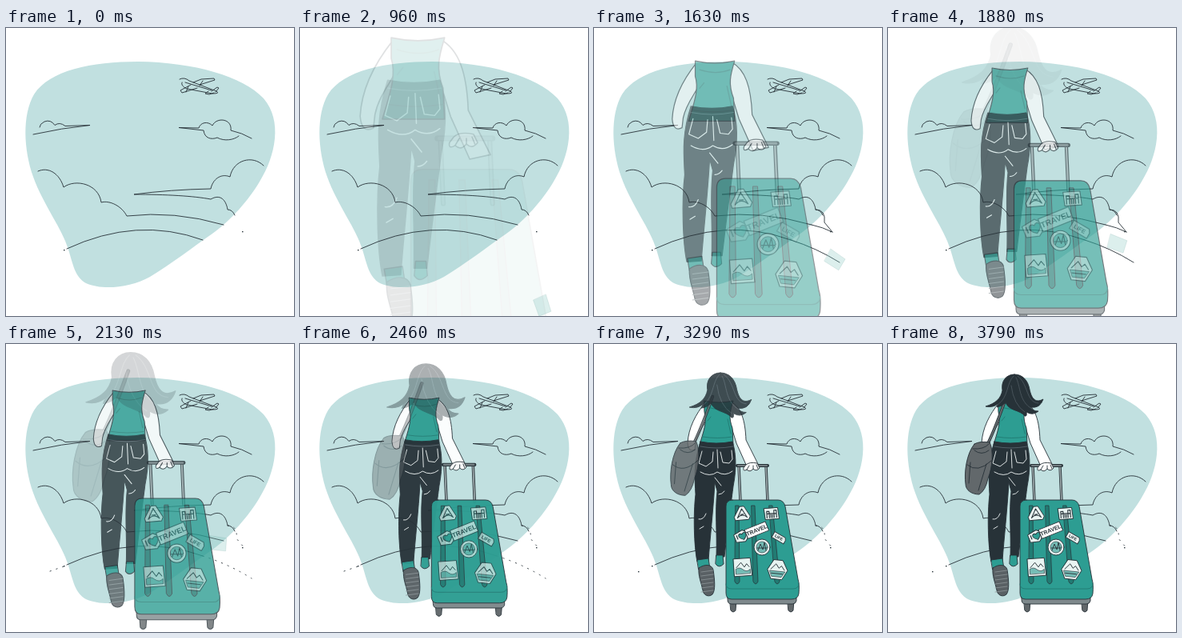
An HTML page with a canvas for the animation above (3.83 s loop, 360 by 360 pixels).

```html
<!DOCTYPE html>
<html>
<head>
<meta charset="utf-8">
<style>
html, body { margin: 0; width: 100%; height: 100%; overflow: hidden; background: #fff; }
canvas { display: block; width: 360px; height: 360px; }
</style>
</head>
<body>
<canvas id="stage" width="360" height="360"></canvas>
<script>
const LOOP = 3830, STEP = 40, START = 710;
const INK = '#273238', TEAL = '#2d9d92', DEEP = '#217b73', SKY = '#c1e0e0', GREY = '#62686b';
const CENTRE = [178, 186];
const stage = document.getElementById('stage').getContext('2d');
const layerCanvas = document.createElement('canvas');
layerCanvas.width = layerCanvas.height = 360;
const layer = layerCanvas.getContext('2d');

const clamp = v => Math.min(1, Math.max(0, v));
const paths = new Map();
function pathOf(d) {
  if (!paths.has(d)) paths.set(d, new Path2D(d));
  return paths.get(d);
}
function shape(c, d, fill, stroke = INK, width = 0.9) {
  const p = pathOf(d);
  if (fill) { c.fillStyle = fill; c.fill(p); }
  if (stroke) { c.strokeStyle = stroke; c.lineWidth = width; c.stroke(p); }
}
const line = (c, d, color = INK, width = 0.9) => shape(c, d, null, color, width);

function placed(c, x, y, degrees, draw) {
  c.save();
  c.translate(x, y);
  c.rotate(degrees * Math.PI / 180);
  draw();
  c.restore();
}

function scenery(c) {
  shape(c, 'M165 42C235 43 296 60 322 88C346 116 337 160 317 192C304 214 282 240 258 257C235 273 205 296 180 311C155 325 120 328 100 319C86 311 84 296 78 277C70 250 47 222 34 186C22 152 20 109 35 83C54 53 107 42 165 42Z', SKY, null);
  line(c, 'M34 133Q70 125 105 121.5L74 122.5Q67 117 61 121.5Q56 114 48 117Q42 120 42 124');
  line(c, 'M307 138Q295 131 281 128C283 113 263 111 258 122C252 116 243 118 241 125L216 124.5L247 128C248 138 257 140 264 137C273 142 285 140 291 135');
  line(c, 'M40 179C53 173 67 182 72 199C87 188 116 195 119 218C130 215 145 223 151 235Q210 228 272 246');
  line(c, 'M76 276Q164 235 246 265');
  line(c, 'M322 172C308 158 284 165 280 186C268 181 258 190 256 201Q205 202 160 208C200 208 235 210 256 214C268 207 275 215 277 227Q283 227 286 234');
  line(c, 'M217 64Q223 61 229 66L263 79Q268 82 258 82L226 76Q218 72 220 68M234 68L244 64L260 63L261 65L242 71M231 71L218 78L220 81L239 75M246 66L242 72M228 73L225 80M257 79L264 74L266 75L262 80M253 79L249 82L254 83L260 81M224 68L257 78');
}

function tails(c, t) {
  c.fillStyle = INK;
  c.fillRect(295, 254, 1.5, 1.3);
  c.fillRect(72, 277, 1.5, 1.3);
  if (t < 1300) return;
  const solid = t < 1900;
  c.save();
  if (!solid) c.setLineDash([1.3, 7]);
  if (solid) line(c, 'M272 246Q286 249 298 255M246 265Q278 275 307 293');
  line(c, 'M277 227Q290 227 288 243L298 255');
  if (!solid && t < 3000) line(c, 'M246 265Q278 275 307 293M55 284L78 276');
  if (t >= 3000) c.fillRect(55, 284, 1.5, 1.3);
  c.restore();
}

function torso(c) {
  shape(c, 'M139 73C127 88 118 105 117 124Q118 136 126 132L127 123C130 108 141 98 144 87Z', '#fff');
  shape(c, 'M171 72C184 79 189 95 190 120L205 150L191 153L178 124L168 91Z', '#fff');
  shape(c, 'M138 71Q156 75 174 71C170 84 168 92 173 105L174 126H132C136 112 142 97 138 85Z', TEAL);
  line(c, 'M142 79Q157 84 170 79M142 96L146 91M167 94L171 112M136 116Q154 119 173 116', DEEP);
}

function trousers(c) {
  shape(c, 'M133 122Q153 126 173 122C177 134 179 153 174 178C172 194 168 223 163 266L153 266C154 233 151 211 154 184L151 173C149 208 145 243 143 271L129 272C125 253 124 213 127 188C126 168 124 150 133 122Z', INK);
  line(c, 'M133 128Q153 132 174 128', '#64727a', 0.7);
  line(c, 'M135 134L131 149L140 153L148 147L149 135M158 135L161 148L169 149L173 144L172 133M154 132L155 155M133 160Q145 167 154 160Q164 166 173 159M151 167L159 177M131 219Q137 220 140 212M156 188Q160 188 163 184M132 231L137 228', '#eef3f3');
}

function shoes(c) {
  shape(c, 'M153 264H161L162 275Q156 281 152 275Z', TEAL);
  shape(c, 'M129 270L143 268L145 281L131 282Z', TEAL);
  shape(c, 'M131 280C138 275 147 275 149 282C151 295 152 308 148 313C143 317 137 314 136 308C134 298 130 290 131 280Z', '#596064');
  for (let y = 284; y < 312; y += 5) line(c, `M134 ${y + 1}L149 ${y - 1}`, '#8d9699', 0.8);
}

function hand(c) {
  shape(c, 'M190 151Q194 147 204 149L207 155Q203 160 199 156Q195 161 191 157Q186 160 187 155Z', '#fff');
  line(c, 'M194 152L191 157M199 152V156M203 151L205 156');
}

function handle(c) {
  line(c, 'M181 152L183 197M215 152L217 197', INK, 3.4);
  line(c, 'M181 154L183 197M215 154L217 197', '#9ba6a9', 1.7);
  line(c, 'M179 152H217', INK, 4);
  line(c, 'M180 152H216', '#727c80', 2.2);
}

function suitcase(c) {
  for (const x of [174, 246]) shape(c, `M${x - 4} 320H${x + 4}L${x + 3} 333Q${x} 337 ${x - 3} 333Z`, GREY);
  shape(c, 'M167 315H253V321Q252 325 248 325H172Q167 325 167 320Z', '#7e898c');
  shape(c, 'M173 195H230Q237 195 239 203L255 294Q257 300 256 312Q255 319 247 319H172Q165 319 165 311V203Q165 195 173 195Z', TEAL);
  line(c, 'M165 300Q165 306 172 306H249Q256 306 256 299', DEEP);
  for (const [x, slant] of [[179, 0], [199, 3], [221, 8]])
    shape(c, `M${x - 2} 202H${x + 2}L${x + slant + 3} 297Q${x + slant} 303 ${x + slant - 3} 297Z`, DEEP, INK, 0.7);
}

function stickers(c) {
  const paper = '#e9f4f2', tint = '#75bdb6';
  placed(c, 185, 212, -5, () => {
    shape(c, 'M-2 -9H3L10 4L8 8H-9L-10 4Z', paper);
    line(c, 'M0 -6L-6 5M0 -6L6 5M-2 1H2M-6 5Q0 -1 6 5', INK, 1);
  });
  placed(c, 222, 212, -4, () => {
    shape(c, 'M-9 -7H8L9 7H-8Z', paper);
    line(c, 'M-6 5V-3H-3V5M3 5V-4H6V5M-6 0H6M-1 5V0H1V5', INK, 1.1);
  });
  placed(c, 210, 254, 0, () => {
    shape(c, 'M10 0A10 10 0 1 1 -10 0A10 10 0 1 1 10 0Z', paper);
    shape(c, 'M7 0A7 7 0 1 1 -7 0A7 7 0 1 1 7 0Z', tint, INK, 0.6);
    line(c, 'M-5 4L-2 -4L1 3L3 -6L5 4M-6 1H6');
  });
  placed(c, 186, 279, -4, () => {
    shape(c, 'M-11 -11H10L11 11H-11Z', paper);
    shape(c, 'M-9 8V2Q-4 -1 0 3Q5 7 9 3V8Z', tint, INK, 0.6);
    line(c, 'M-8 0L-2 -6L2 0L5 -4L8 0');
  });
  placed(c, 229, 282, 6, () => {
    shape(c, 'M-5 -12H6L13 0L7 12H-7L-12 1Z', paper);
    shape(c, 'M-9 2H10L6 9H-6Z', tint, INK, 0.6);
    line(c, 'M-8 0L-2 -7L2 -2L5 -5L9 0M-7 5H7');
  });
}

function label(c, text, x, y, size, color) {
  c.fillStyle = color;
  c.font = `bold ${size}px "Liberation Sans", Arial, sans-serif`;
  c.textAlign = 'center';
  c.textBaseline = 'middle';
  c.fillText(text, x, y);
}

function travel(c) {
  placed(c, 195, 236, -22, () => {
    shape(c, 'M-20 -5L-8 -7L-5 -4V5L-9 8L-20 5Z', '#e9f4f2');
    label(c, 'I', -17, 0, 8, INK);
    shape(c, 'M-10 5C-19 -1 -13 -6 -10 -2C-7 -6 -1 -1 -10 5Z', TEAL);
    shape(c, 'M-5 -6H23V6H-5Z', '#fff');
    label(c, 'TRAVEL', 9, 0.5, 7, INK);
  });
}

function tag(c) {
  placed(c, 231, 242, 30, () => {
    shape(c, 'M-8 -4H7L9 -1V4H-8Z', '#e9f4f2');
    label(c, 'LIFE', 0, 0.4, 5, INK);
  });
}

function bag(c) {
  line(c, 'M123 128C132 111 139 91 147 69', INK, 3.6);
  line(c, 'M123 128C132 111 139 91 147 69', GREY, 2);
  shape(c, 'M108 125Q115 121 127 123C132 132 131 154 125 168Q122 183 114 188C105 188 97 183 97 175C95 161 98 137 108 125Z', GREY);
  line(c, 'M99 151Q112 162 129 146M106 131Q120 132 126 125M103 148L101 174M123 150L113 183M108 133Q117 140 126 133');
}

function hair(c) {
  shape(c, 'M158 38C148 38 141 46 143 58C141 68 135 74 122 78Q132 80 138 74L136 79Q143 78 147 73C151 84 165 82 171 90Q174 91 173 85Q181 90 188 84Q181 84 178 79Q190 81 194 69C183 75 179 66 177 57C175 45 168 38 158 38Z', INK);
  line(c, 'M157 40C148 48 151 67 137 76M154 52Q157 76 171 85M160 42C166 52 163 72 180 81M162 40C176 50 172 73 188 74', '#556168', 0.7);
}

// Each part fades in while shrinking around its own pivot.
const parts = [
  { draw: torso, from: 710, to: 2550, grow: 0.4, ease: 1.8, pivot: [155, 97] },
  { draw: trousers, from: 710, to: 2550, grow: 0.2, ease: 1.8, pivot: [155, 260] },
  { draw: shoes, from: 710, to: 2550, grow: 0.2, ease: 1.8, pivot: [145, 285] },
  { draw: handle, from: 880, to: 2500, grow: 0.3, ease: 1.3, pivot: [198, 152] },
  { draw: suitcase, from: 880, to: 2500, grow: 0.35, ease: 1.3, pivot: [210, 242] },
  { draw: hand, from: 710, to: 2550, grow: 0.3, ease: 1.3, pivot: [198, 152] },
  { draw: stickers, from: 950, to: 3300, grow: 0.18, ease: 1.8, pivot: [208, 248] },
  { draw: travel, from: 1400, to: 3300, grow: 0.4, ease: 1.5, pivot: [196, 236] },
  { draw: tag, from: 1400, to: 3300, grow: 0.4, ease: 1.5, pivot: [231, 242] },
  { draw: bag, from: 1750, to: 3600, grow: 0.31, ease: 1.2, pivot: [113, 155] },
  { draw: hair, from: 1790, to: 3600, grow: 0.5, ease: 1.1, pivot: [158, 64] }
];

function scaleAbout(c, [x, y], s) {
  c.translate(x, y);
  c.scale(s, s);
  c.translate(-x, -y);
}

function drawPart(part, t) {
  const left = 1 - clamp((t - part.from) / (part.to - part.from));
  if (left === 1) return;
  const groupLeft = 1 - clamp((t - START) / 1890);
  layer.setTransform(1, 0, 0, 1, 0, 0);
  layer.clearRect(0, 0, 360, 360);
  scaleAbout(layer, CENTRE, 1 + 0.48 * groupLeft ** 1.12);
  scaleAbout(layer, part.pivot, 1 + part.grow * left ** part.ease);
  part.draw(layer);
  stage.globalAlpha = 1 - left ** 1.1;
  stage.drawImage(layerCanvas, 0, 0);
  stage.globalAlpha = 1;
}

function scrap(c, t) {
  if (t < 900 || t > 2300) return;
  const u = (t - 960) / 1170;
  c.globalAlpha = 0.3;
  placed(c, 303 + 45 * u - 86 * u * u, 346 - 98 * u, 75 - 65 * u, () =>
    shape(c, 'M-12 -8L10 -9L12 7L-9 9Z', '#8bc9c3', '#5d9690', 0.5));
  c.globalAlpha = 1;
}

function frame(now) {
  const time = now % LOOP;
  const t = time < START ? 0 : START + STEP * Math.floor((time - START) / STEP);
  stage.fillStyle = '#fff';
  stage.fillRect(0, 0, 360, 360);
  scenery(stage);
  tails(stage, t);
  scrap(stage, t);
  for (const part of parts) drawPart(part, t);
  requestAnimationFrame(frame);
}

for (const c of [stage, layer]) c.lineJoin = c.lineCap = 'round';
requestAnimationFrame(frame);
</script>
</body>
</html>
```
